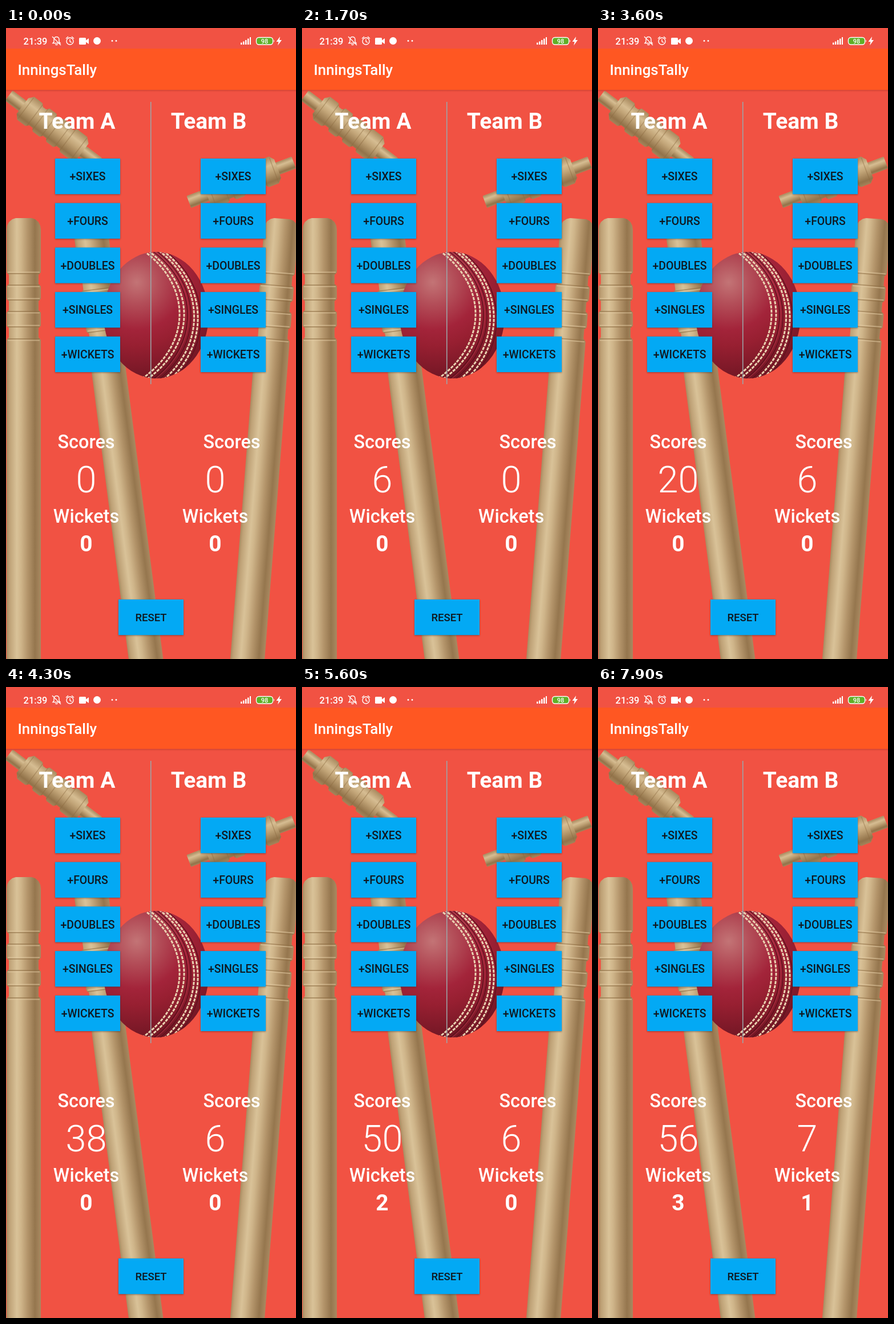
These frames come from a looping animation (508x1102 px, 8 s). An HTML page:

```html
<!DOCTYPE html>
<html lang="en">
<head>
<meta charset="utf-8">
<title>Cricket tally</title>
<style>
html, body { margin: 0; width: 100%; height: 100%; overflow: hidden; background: #f15243; }
svg { display: block; width: 508px; height: 1102px; font-family: Roboto, sans-serif; font-weight: 500; }
.mid { text-anchor: middle; }
.team { font-size: 38.9px; font-weight: 700; }
.label { font-size: 32.4px; }
.score { font-size: 64.8px; font-weight: 300; }
.wicket { font-size: 38.9px; font-weight: 600; }
.button rect { fill: #03a9f4; filter: drop-shadow(0 1.5px 1.5px rgba(70, 20, 10, .45)); }
.button text { fill: #101820; }
</style>
</head>
<body>
<svg viewBox="0 0 508 1102">
  <defs>
    <linearGradient id="wood">
      <stop offset="0" stop-color="#a98b60"/>
      <stop offset=".08" stop-color="#bea176"/>
      <stop offset=".3" stop-color="#d9c298"/>
      <stop offset=".42" stop-color="#cfb58a"/>
      <stop offset=".62" stop-color="#b3946a"/>
      <stop offset=".83" stop-color="#95764e"/>
      <stop offset="1" stop-color="#a98960"/>
    </linearGradient>
    <linearGradient id="bailWood" x2="0" y2="1">
      <stop offset="0" stop-color="#a98a5f"/>
      <stop offset=".3" stop-color="#d6bd92"/>
      <stop offset=".5" stop-color="#c3a679"/>
      <stop offset=".85" stop-color="#92734a"/>
      <stop offset="1" stop-color="#a4845a"/>
    </linearGradient>
    <radialGradient id="leather" gradientUnits="userSpaceOnUse" cx="229" cy="444" r="180">
      <stop offset="0" stop-color="#c37476"/>
      <stop offset=".2" stop-color="#b4505a"/>
      <stop offset=".46" stop-color="#a3243a"/>
      <stop offset=".62" stop-color="#971f31"/>
      <stop offset="1" stop-color="#6b1522"/>
    </radialGradient>
    <linearGradient id="barShade" x2="0" y2="1">
      <stop offset="0" stop-color="#a8321f" stop-opacity=".4"/>
      <stop offset="1" stop-color="#a8321f" stop-opacity="0"/>
    </linearGradient>
    <clipPath id="ballClip"><ellipse cx="263" cy="501.500" rx="92" ry="110.500"/></clipPath>
  </defs>

  <rect width="508" height="1102" fill="#f15243"/>
  <g id="scene"></g>
  <rect y="108" width="508" height="4" fill="url(#barShade)"/>
  <rect y="36" width="508" height="72" fill="#ff5722"/>
  <path d="M253.700 129V622" stroke="#9ca5a9" stroke-width="1.600"/>

  <g id="status" fill="#fff">
    <text x="30.500" y="28.500" font-size="16.500">21:39</text>
    <g fill="none" stroke="#fff" stroke-width="1.400">
      <path d="M82 26.500h13l-2-2.500v-4c0-6-9-6-9 0v4zM86.500 28.500q2 2 4 0M81 15l15 15"/>
      <circle cx="112" cy="23" r="6"/>
      <path d="M112 19.500v4l3 1.800M105 18.500l4-3.500M119 18.500l-4-3.500"/>
    </g>
    <rect x="128" y="17" width="12" height="12" rx="1.500"/>
    <path d="M140 21.500l5-3.500v10l-5-3.500z"/>
    <circle cx="159.500" cy="22.500" r="6.500"/>
    <circle cx="186" cy="22.500" r="1.400"/>
    <circle cx="193" cy="22.500" r="1.400"/>
    <path d="M411 25.500h2.500v3.500h-2.500zM415 23.500h2.500v5.500h-2.500zM419 21h2.500v8h-2.500zM423 18.500h2.500v10.500h-2.500zM427 16h2v13h-2z"/>
    <rect x="438.500" y="16.500" width="29" height="12.500" rx="4.500" fill="#5faf27" stroke="#fff" stroke-width="1.400"/>
    <path d="M469 20.500q2 2 0 4.500z"/>
    <text class="mid" x="453" y="27" font-size="11">98</text>
    <path d="M480 15l-6.500 9h4l-1.500 6.500 7-9.500h-4z"/>
  </g>

  <text x="20.500" y="82" font-size="25.900" fill="#fff">InningsTally</text>
  <g id="buttons"></g>
  <g id="labels" class="mid" fill="#fff"></g>
</svg>

<script>
const $ = id => document.getElementById(id);

// Turned outline along y from [position, half width] pairs.
function turned(profile, along) {
  const point = ([p, h], side) => along === 'y' ? `${side * h} ${p}` : `${p} ${side * h}`;
  const near = profile.map(p => point(p, -1));
  const far = profile.map(p => point(p, 1)).reverse();
  return 'M' + near.concat(far).join('L') + 'Z';
}

function stump(x, y, angle) {
  const profile = [[0, 14], [2, 20], [7, 26], [13, 29], [20, 30], [95, 30], [99, 26],
    [115, 26], [119, 30], [141, 30], [145, 26], [161, 26], [165, 30], [188, 30],
    [192, 26], [208, 26], [213, 30], [820, 30]];
  const edges = [97, 117, 143, 163, 190, 211].map((p, i) => {
    const w = 28;
    const below = i % 2 ? 2.5 : -2.5;
    return `<path d="M${-w} ${p}H${w}" stroke="#8d6c42" stroke-opacity=".55" stroke-width="1.800"/>
      <path d="M${-w} ${p + below}H${w}" stroke="#e2cba2" stroke-opacity=".55" stroke-width="2"/>`;
  }).join('');
  return `<g transform="translate(${x} ${y}) rotate(${angle})">
    <path d="${turned(profile, 'y')}" fill="url(#wood)"/>${edges}</g>`;
}

function bail(x, y, angle, flip) {
  const profile = [[0, 10], [2, 11], [30, 11], [30, 17], [37, 25], [55, 25], [60, 20],
    [67, 20], [71, 25], [86, 25], [90, 20], [97, 20], [101, 25], [116, 25], [120, 20],
    [127, 20], [131, 25], [153, 25], [162, 17], [162, 11], [194, 11], [196, 10]];
  const edges = [37, 57, 69, 88, 99, 118, 129, 154].map(p =>
    `<path d="M${p} -23V23" stroke="#8d6c42" stroke-opacity=".45" stroke-width="1.500"/>`).join('');
  return `<g transform="translate(${x} ${y}) rotate(${angle}) scale(${flip} 1)">
    <path d="${turned(profile, 'x')}" fill="url(#bailWood)"/>
    <path d="M0 -11H30V11H0ZM162 -11H196V11H162Z" fill="url(#bailWood)"/>${edges}</g>`;
}

// A seam bows right from its top to its bottom, passing x = mid halfway down.
function seam(top, mid, bottom, style) {
  const c = (8 * mid - top - bottom) / 6;
  return `<path d="M${top} 389C${c} 450 ${c} 553 ${bottom} 614" fill="none" ${style}/>`;
}

function ball() {
  const thread = 'stroke="#ead1b0" stroke-width="3" stroke-dasharray="5.500 1.800"';
  const groove = 'stroke="#5f101d" stroke-width="1.500"';
  const ridge = 'stroke="#b53a4a" stroke-opacity=".6" stroke-width="1.200"';
  return `<g clip-path="url(#ballClip)">
    <rect x="170" y="390" width="190" height="224" fill="url(#leather)"/>` +
    seam(241, 304, 236, thread) + seam(249, 312, 246, thread) +
    seam(256, 318, 257, groove) + seam(258, 320, 260, ridge) +
    seam(263, 324, 268, groove) +
    seam(268, 329.500, 276, thread) + seam(275, 336, 287, thread) +
    seam(279, 341, 294, groove) + '</g>';
}

$('scene').innerHTML =
  bail(5, 118, 37, 1) + bail(504, 235, -20.500, -1) +
  stump(31, 332, 0) + stump(146.500, 340, -7.370) + stump(483.500, 333, 4.500) + ball();

function button(x, y, text, size) {
  return `<g class="button"><rect x="${x}" y="${y}" width="114" height="62.200"/>
    <text class="mid" x="${x + 57}" y="${y + 38.200}" font-size="${size}">${text}</text></g>`;
}

const actions = ['+SIXES', '+FOURS', '+DOUBLES', '+SINGLES', '+WICKETS'];
$('buttons').innerHTML = [86, 341].map(x =>
  actions.map((text, i) => button(x, 228 + i * 77.700, text, 19.400)).join('')).join('') +
  button(197, 998, 'RESET', 18.500);

const label = (style, x, y, text, id = '') =>
  `<text class="${style}" id="${id}" x="${x}" y="${y}">${text}</text>`;

$('labels').innerHTML =
  label('team', 124.500, 176, 'Team A') + label('team', 355, 176, 'Team B') +
  label('label', 140.500, 734, 'Scores') + label('label', 395.500, 734, 'Scores') +
  label('label', 140.500, 864, 'Wickets') + label('label', 366.500, 864, 'Wickets') +
  label('score', 140.500, 811, 0, 'runsA') + label('score', 366.500, 811, 0, 'runsB') +
  label('wicket', 140.500, 914, 0, 'outsA') + label('wicket', 366.500, 914, 0, 'outsB');

// Taps: time in ms, counter, amount added.
const taps = [
  [1300, 'runsA', 6], [2000, 'runsA', 2], [2400, 'runsB', 4], [2900, 'runsB', 2],
  [3400, 'runsA', 6], [3600, 'runsA', 6], [3800, 'runsA', 6], [4000, 'runsA', 6],
  [4200, 'runsA', 6], [4500, 'runsA', 6], [4700, 'runsA', 6],
  [5100, 'outsA', 1], [5400, 'outsA', 1], [6200, 'runsA', 6],
  [6800, 'outsA', 1], [7300, 'runsB', 1], [7700, 'outsB', 1]
];
const counters = ['runsA', 'runsB', 'outsA', 'outsB'];

function draw(now) {
  const time = now % 8000;
  for (const id of counters) {
    const total = taps.reduce((sum, [at, key, add]) =>
      key === id && at <= time ? sum + add : sum, 0);
    if ($(id).textContent !== String(total)) $(id).textContent = total;
  }
  requestAnimationFrame(draw);
}
requestAnimationFrame(draw);
</script>
</body>
</html>
```
